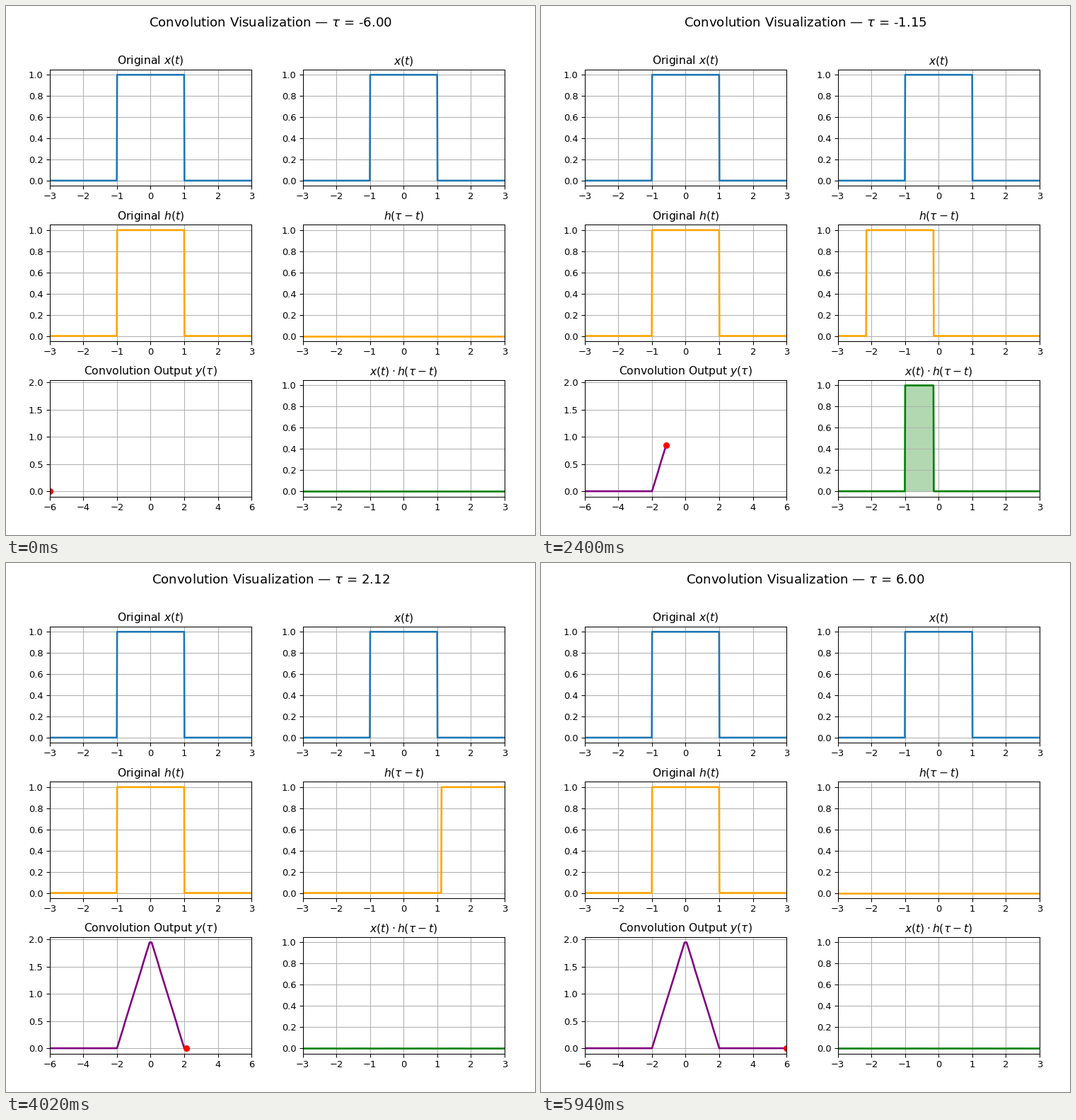
A matplotlib script that plays this animation: 748 by 748 pixels, repeating every 6 s.

```python
import numpy as np
import matplotlib.pyplot as plt
from matplotlib.animation import FuncAnimation

SIZE = 748
DPI = 93.5
FRAMES = 100
INTERVAL = 60

# Subplot grid in pixels, measured from the top left corner
LEFTS = (61.8, 419.6)
TOPS = (89.8, 309.4, 529.0)
AX_W, AX_H = 285.4, 164.6


def pulse(t):
    return np.where(np.abs(t) <= 1, 1.0, 0.0)


t = np.linspace(-6, 6, 1200)
dt = t[1] - t[0]
taus = np.linspace(-6, 6, FRAMES)
x = pulse(t)
y = np.array([np.sum(x * pulse(tau - t)) * dt for tau in taus])

fig = plt.figure(figsize=(SIZE / DPI, SIZE / DPI), dpi=DPI)
heading = fig.suptitle("", fontsize=14)


def panel(row, col, title, xmax=3, ymax=1.0):
    ax = fig.add_axes([LEFTS[col] / SIZE, 1 - (TOPS[row] + AX_H) / SIZE,
                       AX_W / SIZE, AX_H / SIZE])
    ax.set_title(title)
    ax.set_xlim(-xmax, xmax)
    ax.set_ylim(-0.05 * ymax, 1.05 * ymax)
    ax.grid(True)
    return ax


panel(0, 0, "Original $x(t)$").plot(t, x, lw=2)
panel(0, 1, "$x(t)$").plot(t, x, lw=2)
panel(1, 0, "Original $h(t)$").plot(t, pulse(t), color="orange", lw=2)
ax_h = panel(1, 1, r"$h(\tau - t)$")
ax_y = panel(2, 0, r"Convolution Output $y(\tau)$", xmax=6, ymax=y.max())
ax_p = panel(2, 1, r"$x(t) \cdot h(\tau - t)$")

h_line, = ax_h.plot([], [], color="orange", lw=2)
y_line, = ax_y.plot([], [], color="purple", lw=2)
y_dot, = ax_y.plot([], [], "ro")
p_line, = ax_p.plot([], [], color="green", lw=2)
area = ax_p.fill_between(t, 0 * t, color="green", alpha=0.3)


def update(i):
    tau = taus[i]
    h = pulse(tau - t)
    product = x * h
    heading.set_text(rf"Convolution Visualization — $\tau$ = {tau:.2f}")
    h_line.set_data(t, h)
    p_line.set_data(t, product)
    outline = np.column_stack([t, product])
    area.set_verts([np.vstack([[t[0], 0], outline, [t[-1], 0]])])
    y_line.set_data(taus[:i + 1], y[:i + 1])
    y_dot.set_data([tau], [y[i]])
    return heading, h_line, p_line, area, y_line, y_dot


anim = FuncAnimation(fig, update, frames=FRAMES, interval=INTERVAL,
                     repeat=True, repeat_delay=0, blit=False)
plt.show()
```
